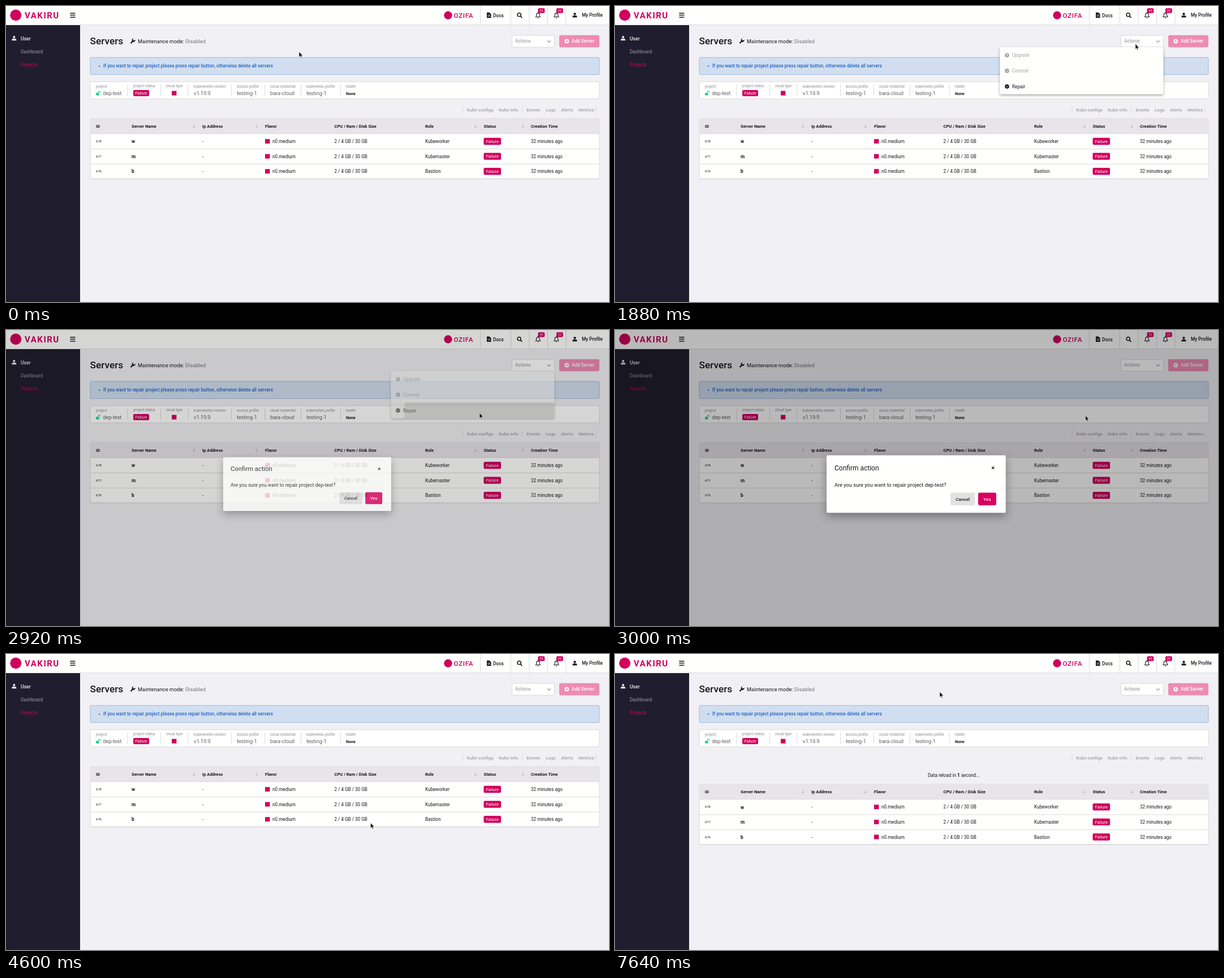
An HTML page for the animation above (8 s loop, 1066 by 525 pixels).

```html
<!DOCTYPE html>
<html lang="en">
<head>
<meta charset="utf-8">
<title>Servers</title>
<style>
html, body { margin: 0; width: 100%; height: 100%; overflow: hidden; background: #f1f0f4; }
svg { display: block; width: 1066px; height: 525px; font-family: Roboto, sans-serif; }
text { white-space: pre; }
.menu-panel { filter: drop-shadow(0 2px 2px rgba(0,0,0,.35)); }
.dialog-panel { filter: drop-shadow(0 6px 8px rgba(0,0,0,.35)); }
</style>
</head>
<body>
<svg id="stage" viewBox="0 0 1066 525"></svg>
<script>
const PINK = '#d1005d', INK = '#16151c', GRAY = '#8d8b94', LINE = '#d3d1d6';

// Drawing helpers; text is placed by the middle of its capitals.
const text = (x, cy, str, size = 8.13, weight = 400, fill = INK, extra = '') =>
  `<text x="${x}" y="${cy + size * .355}" font-size="${size}" font-weight="${weight}" fill="${fill}" ${extra}>${str}</text>`;
const middle = 'text-anchor="middle"';
const rect = (x, y, w, h, fill, extra = '') =>
  `<rect x="${x}" y="${y}" width="${w}" height="${h}" fill="${fill}" ${extra}/>`;
const circle = (x, y, r, fill, extra = '') => `<circle cx="${x}" cy="${y}" r="${r}" fill="${fill}" ${extra}/>`;
const path = (d, fill, extra = '') => `<path d="${d}" fill="${fill}" ${extra}/>`;
const stroke = (d, color, width = 1) => path(d, 'none', `stroke="${color}" stroke-width="${width}"`);
const at = (x, y, body) => `<g transform="translate(${x} ${y})">${body}</g>`;

const person = (x, y, fill) => at(x, y, circle(0, -2.2, 2.1, fill) + path('M-4 4V2.6Q-4 .5-1.6 .5H1.6Q4 .5 4 2.6V4Z', fill));
const bell = (x, count) => at(x, 16.5,
  stroke('M-4 2.8Q-2.7 1.6-2.7-1Q-2.7-3.9 0-3.9Q2.7-3.9 2.7-1Q2.7 1.6 4 2.8Z', INK, 1.1) +
  path('M-1.2 4H1.2Q.9 5.2 0 5.2Q-.9 5.2-1.2 4ZM-.6-5.2H.6V-3.8H-.6Z', INK)) +
  rect(x, 4, 11.8, 8.4, PINK, 'rx="2"') + text(x + 5.9, 8.2, count, 5.8, 400, '#fff', middle);
const chevron = (x, y) => stroke(`M${x - 2.8} ${y - 1.3}l2.8 2.8 2.8-2.8`, GRAY, 1.1);
const sortArrow = (x, y) => stroke(`M${x} ${y - 3.2}v6.2m-2.6-2.6l2.6 2.6 2.6-2.6`, '#b7b5bd', .9);
const badge = (x, y, w, h, size) => rect(x, y - h / 2, w, h, PINK, 'rx="2.2"') +
  text(x + w / 2, y, 'Failure', size, 400, '#fff', middle);
const tick = (x, y, fill) => circle(x, y, 3.8, fill) + stroke(`M${x - 1.8} ${y}l1.3 1.4 2.4-2.6`, '#fff', 1);

const header = () =>
  rect(0, 0, 1066, 33.5, '#fffffe') + rect(0, 33.2, 1066, .8, LINE) +
  circle(17.3, 16.3, 10, PINK) + text(33, 16.8, 'VAKIRU', 15, 700, PINK, 'letter-spacing="1.5"') +
  stroke('M113.3 12.8h9.2M113.3 16.3h9.2M113.3 19.8h9.2', INK, 1.6) +
  circle(781.5, 16.5, 7.2, PINK) + text(791.5, 16.7, 'OZIFA', 11.8, 500, PINK, 'letter-spacing=".6"') +
  [838, 892, 924.5, 957, 989.5].map(x => rect(x, 0, .8, 33.2, LINE)).join('') +
  path('M850 11.5h4.6l2.9 2.9v6.6h-7.5Z', INK) + stroke('M851.5 16h4.5M851.5 18.2h4.5', '#fff', .8) +
  text(861, 16.6, 'Docs', 8.3, 500) +
  circle(907.2, 15.6, 3.1, 'none', `stroke="${INK}" stroke-width="1.5"`) + stroke('M909.4 17.8l3 3', INK, 1.7) +
  bell(940.5, 43) + bell(973, 22) + person(1005.5, 16.3, INK) + text(1018, 16.6, 'My Profile', 8.13, 500);

const sidebar = () =>
  rect(0, 34, 131, 491, '#201e2e') + person(14.3, 57.3, '#e4e2ea') +
  text(26, 57.6, 'User', 8.6, 500, '#eeedf2') +
  text(26, 81, 'Dashboard', 8.13, 400, '#9b99a5') + text(26, 104.2, 'Projects', 8.13, 400, PINK);

const heading = () =>
  text(148.5, 62.3, 'Servers', 17.3, 500) +
  stroke('M220.5 66l4.6-4.6', INK, 2.3) +
  path('M228.6 59.8a3.1 3.1 0 1 1-2.8-2.3l-1.5 1.7.4 1.6 1.6.4Z', INK) +
  text(233, 62.5, 'Maintenance mode:', 9.29) + text(317, 62.5, 'Disabled', 9.29, 500, GRAY) +
  rect(894.5, 52.2, 75, 20.8, '#fffffe', `rx="2" stroke="${LINE}" stroke-width=".8"`) +
  text(900, 62.4, 'Actions', 8.2, 400, GRAY) + chevron(960, 62.6) +
  rect(978, 51.8, 71, 21.4, '#ee8bb3', 'rx="2.4"') + circle(991.3, 62.4, 3.9, '#fff') +
  stroke('M989.2 62.4h4.2M991.3 60.3v4.2', '#ee8bb3', 1.1) + text(1000, 62.4, 'Add Server', 8.13, 500, '#fff') +
  rect(149, 91.2, 900, 30.4, '#d0deef', 'rx="2" stroke="#8fb2d9" stroke-width=".8"') +
  circle(165, 106.6, 1.2, '#2566c8') +
  text(172, 106.4, 'If you want to repair project please press repair button, otherwise delete all servers', 8.13, 500, '#2566c8');

const info = () => {
  const fields = [[159, 'project', 171.3, 'dep-test'], [332, 'kuberenetes version', 332, 'v1.19.9'],
    [408, 'access profile', 408, 'testing-1'], [467, 'cloud credential', 467, 'bara-cloud'],
    [531, 'kubernetes profile', 531, 'testing-1']];
  const label = (x, str, y = 142.8) => text(x, y, str, 6.35, 400, GRAY);
  return rect(149, 134.2, 900, 30.6, '#fffffe', `rx="2" stroke="${LINE}" stroke-width=".8"`) +
    fields.map(([x, name, vx, value]) => label(x, name) + text(vx, 154.4, value, 9.29, 300)).join('') +
    rect(159, 154, 5.6, 4.6, '#1fd58c', 'rx=".8"') + stroke('M163.2 154.4v-1.6a1.7 1.7 0 0 1 3.4 0v1.2', '#1fd58c', 1.1) +
    label(225, 'project status', 142) + badge(225, 154.4, 28, 11, 7) +
    label(283, 'cloud type', 142) + rect(293, 150.6, 8.4, 8, PINK) +
    label(601, 'health') + text(601, 155.2, 'None', 7.1, 700) +
    [214.5, 273, 321.5, 398, 457, 521, 591].map(x => rect(x, 139, .8, 21, LINE)).join('');
};

const tabs = () =>
  [[815, 'Kube configs'], [871, 'Kube Info'], [920.5, 'Events'], [954, 'Logs'], [981, 'Alerts'], [1012, 'Metrics']]
    .map(([x, str]) => text(x, 183.8, str, 8.05, 500, '#a19fa7')).join('') +
  [807.5, 912.5, 1042.5].map(x => rect(x, 177.5, .8, 13, LINE)).join('');

const table = () => {
  const columns = [[159, 'ID'], [222, 'Server Name'], [347, 'Ip Address'], [458, 'Flavor'],
    [580.5, 'CPU / Ram / Disk Size'], [741, 'Role'], [844.5, 'Status'], [928, 'Creation Time']];
  const row = ([id, name, role], i) => {
    const y = 240 + i * 26.6;
    return rect(149, y + 13.2, 900, .8, LINE) + text(159, y, id, 5.9) + text(222, y + .3, name, 8.3, 700) +
      text(347, y + .3, '-') + rect(458, y - 4, 8.4, 8, PINK) + text(471, y + .3, 'n0.medium') +
      text(580.5, y + .3, '2 / 4 GB / 30 GB') + text(741, y + .3, role) +
      badge(844.5, y, 30.6, 12.4, 7.54) + text(928, y + .3, '32 minutes ago');
  };
  return rect(149, 199.6, 900, 106.8, '#fffffe', `rx="2" stroke="${LINE}" stroke-width=".8"`) +
    rect(149, 199.6, 900, 26.6, '#e7e5ea') + rect(149, 226, 900, .8, LINE) +
    columns.map(([x, str]) => text(x, 213.3, str, 7.54, 700)).join('') +
    [332.3, 443, 830, 913.5].map(x => sortArrow(x, 213)).join('') +
    [[678, 'w', 'Kubeworker'], [677, 'm', 'Kubemaster'], [676, 'b', 'Bastion']].map(row).join('');
};

const menu = () =>
  rect(680.3, 73, 289.2, 83.6, '#fffffe', 'rx="2" class="menu-panel"') +
  rect(680.3, 128.8, 289.2, 27.8, '#000', 'id="hover" opacity="0"') +
  `<g clip-path="url(#itemClip)">${circle(837, 147, 0, '#000', 'id="ripple" opacity=".16"')}</g>` +
  circle(693, 87.2, 3.8, '#a3a1a6') + stroke('M693 89.3v-4m-1.7 1.7l1.7-1.7 1.7 1.7', '#fff', .9) +
  text(702, 87.2, 'Upgrade', 8.2, 400, '#a3a1a6') +
  tick(693, 114.9, '#a3a1a6') + text(702, 115, 'Commit', 8.2, 400, '#a3a1a6') +
  tick(693, 142.7, INK) + text(702, 142.7, 'Repair', 8.2);

const dialog = () =>
  rect(374, 222.3, 316.8, 102, '#fffffe', 'rx="2.3" class="dialog-panel"') +
  text(388, 244.6, 'Confirm action', 12) + stroke('M666.3 242.5l4 4m0-4l-4 4', INK, 1.2) +
  text(388, 275.1, 'Are you sure you want to repair project dep-test?', 9.25) +
  rect(593, 288.6, 43.4, 22.4, '#e3e2e3', 'rx="2.4"') + text(614.7, 299.8, 'Cancel', 8.13, 500, INK, middle) +
  rect(642, 288.6, 32, 22.4, '#d9005f', 'rx="2.4" id="yes"') + text(658, 299.8, 'Yes', 8.13, 500, '#fff', middle);

const arrow = path('M0 0V9.6L2.2 7.6 3.7 11 5.2 10.3 3.8 7.1H6.7Z', '#111', 'id="arrow" stroke="#fff" stroke-width=".6"');
const hand = path('M-.9 .9Q0-.5 .9 .9V4L5 5.2Q6 5.6 5.8 6.7L5 11H.4L-2.6 7.2Q-2.6 5.7-.9 6.8Z', '#111',
  'id="hand" stroke="#fff" stroke-width=".8"');

const stage = document.getElementById('stage');
stage.innerHTML =
  '<clipPath id="itemClip"><rect x="680.3" y="128.8" width="289.2" height="27.8"/></clipPath>' +
  rect(0, 0, 1066, 525, '#f1f0f4') + header() + sidebar() + heading() + info() + tabs() +
  `<text id="reload" x="598.8" y="217.7" font-size="8.13" fill="${INK}" ${middle}></text>` +
  `<g id="table">${table()}</g><g id="menu">${menu()}</g>` +
  rect(0, 0, 1066, 525, '#000', 'id="backdrop"') +
  `<g id="dialog">${dialog()}</g><g id="cursor">${arrow}${hand}</g>`;

const el = id => document.getElementById(id);
const set = (id, attrs) => { for (const k in attrs) el(id).setAttribute(k, attrs[k]); };
const progress = (t, start, length) => Math.min(1, Math.max(0, (t - start) / length));
const smooth = p => p * p * (3 - 2 * p);

function bezier(x1, y1, x2, y2) {
  const curve = (a, b, u) => 3 * a * u * (1 - u) ** 2 + 3 * b * u * u * (1 - u) + u ** 3;
  return p => {
    let lo = 0, hi = 1;
    for (let i = 0; i < 20; i++) {
      const u = (lo + hi) / 2;
      if (curve(x1, x2, u) < p) lo = u; else hi = u;
    }
    return curve(y1, y2, lo);
  };
}
const decelerate = bezier(0, 0, .2, 1), swift = bezier(.25, .8, .25, 1);

// Cursor stops: time, x, y
const stops = [[0, 518, 81], [560, 518, 81], [760, 690, 94], [1000, 918.5, 74.5], [1200, 918.5, 74.5], [1280, 920, 67],
  [1870, 920, 67], [2560, 837, 147], [2940, 837, 147], [3520, 657, 300], [3960, 657, 300], [4560, 644.5, 299.5],
  [4610, 644.5, 299.5], [4680, 634.5, 287.5], [4730, 634.5, 287.5], [5080, 574, 67], [8000, 574, 67]];

function cursorAt(t) {
  const i = stops.findIndex(s => s[0] > t), [t0, x0, y0] = stops[i - 1], [t1, x1, y1] = stops[i];
  const k = smooth((t - t0) / (t1 - t0));
  return [x0 + (x1 - x0) * k, y0 + (y1 - y0) * k];
}

function draw(t) {
  const [x, y] = cursorAt(t), pointing = t >= 3540 && t < 4160;
  set('cursor', { transform: `translate(${x} ${y})` });
  set('arrow', { visibility: pointing ? 'hidden' : 'visible' });
  set('hand', { visibility: pointing ? 'visible' : 'hidden' });

  const grow = .8 + .2 * decelerate(progress(t, 1215, 120));
  set('menu', {
    opacity: progress(t, 1225, 100) * (1 - progress(t, 2880, 100)),
    transform: `translate(969.5 73) scale(${grow}) translate(-969.5 -73)`
  });
  set('hover', { opacity: t > 1900 && y > 129 ? .04 : 0 });
  set('ripple', { r: 157 * decelerate(progress(t, 2715, 400)) });

  set('backdrop', { opacity: .32 * (swift(progress(t, 2854, 400)) - swift(progress(t, 3905, 400))) });
  const open = decelerate(progress(t, 2854, 150));
  set('dialog', {
    opacity: open * (1 - smooth(progress(t, 3893, 75))),
    transform: `translate(532.4 273.3) scale(${.7 + .3 * open}) translate(-532.4 -273.3)`
  });
  const shade = progress(t, 3560, 200);
  set('yes', { fill: `rgb(${217 - 17 * shade},0,${95 - 6 * shade})` });

  const left = t < 5640 ? 0 : t < 6600 ? 3 : t < 7640 ? 2 : 1;
  set('table', { transform: `translate(0 ${left ? 31.3 : 0})` });
  el('reload').innerHTML = left
    ? `Data reload in <tspan font-weight="700">${left}</tspan> second${left > 1 ? 's' : ''}...` : '';
}

function tick40() {
  draw(Math.floor(performance.now() % 8000 / 40) * 40);
  requestAnimationFrame(tick40);
}
tick40();
</script>
</body>
</html>
```
